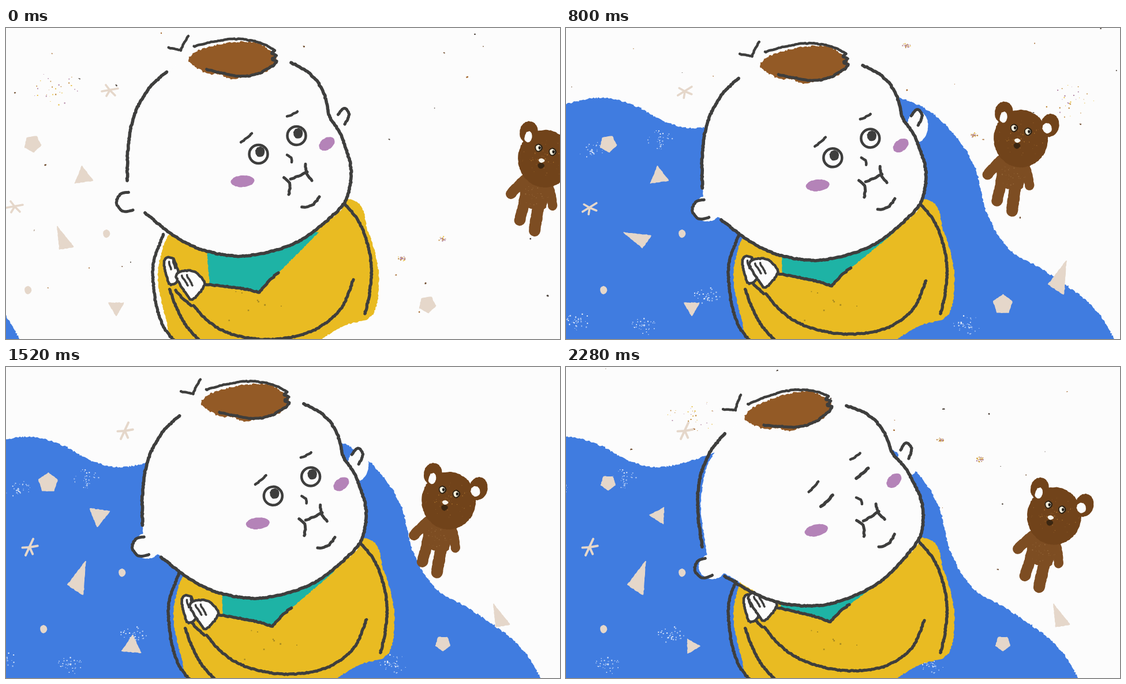
Animation of 960x540 px, one loop 2320 ms. Source, as an HTML page:

```html
<!DOCTYPE html>
<html lang="en">
<head>
<meta charset="utf-8">
<title>Sleepy baby and bear</title>
<style>
html, body { margin: 0; width: 100%; height: 100%; overflow: hidden; background: #fcfcfc; }
svg { display: block; width: 100vw; height: 100vh; }
</style>
</head>
<body>
<svg id="stage" viewBox="0 0 960 540"></svg>
<script>
const LOOP = 2320, STEP = 40;
const INK = '#3e3e3d', PAPER = '#fcfcfc', BEIGE = '#e5d7ca', YELLOW = '#e9bb22';
const FUR = '#7d4d22', FACE = '#71431a', BLUSH = '#b483b8';
const stage = document.getElementById('stage');

function el(parent, tag, attrs) {
  const node = document.createElementNS('http://www.w3.org/2000/svg', tag);
  for (const k in attrs) node.setAttribute(k, attrs[k]);
  parent.appendChild(node);
  return node;
}
const group = parent => el(parent, 'g');
const show = (node, on) => node.setAttribute('display', on ? 'inline' : 'none');
const move = (node, value) => node.setAttribute('transform', value);
const parse = s => s.trim().split(/\s+/).map(p => p.split(',').map(Number));

function seeded(seed) {
  return () => {
    seed = (seed + 0x6D2B79F5) | 0;
    let v = Math.imul(seed ^ (seed >>> 15), 1 | seed);
    v = (v + Math.imul(v ^ (v >>> 7), 61 | v)) ^ v;
    return ((v ^ (v >>> 14)) >>> 0) / 4294967296;
  };
}

// Uniform Catmull-Rom between b and c
function spline(a, b, c, d, u) {
  return 0.5 * (2 * b + (c - a) * u + (2 * a - 5 * b + 4 * c - d) * u * u
    + (3 * b - a - 3 * c + d) * u * u * u);
}

// Hand-drawn path: smooth or straight run through the points with a shaky edge
function chalk(pts, { closed = false, rough = 0.7, straight = false } = {}) {
  const rnd = seeded(pts.length * 31 + 5), n = pts.length, out = [];
  const at = i => closed ? pts[(i + n) % n] : pts[Math.max(0, Math.min(n - 1, i))];
  for (let i = 0; i < (closed ? n : n - 1); i++) {
    const a = at(i - 1), b = at(i), c = at(i + 1), d = at(i + 2);
    const count = Math.max(1, Math.round(Math.hypot(c[0] - b[0], c[1] - b[1]) / 2.5));
    for (let k = 0; k < count; k++) {
      const u = k / count;
      out.push([0, 1].map(j => {
        const v = straight ? b[j] + (c[j] - b[j]) * u : spline(a[j], b[j], c[j], d[j], u);
        return (v + (rnd() - 0.5) * 2 * rough).toFixed(1);
      }).join(' '));
    }
  }
  if (!closed) out.push(at(n - 1).join(' '));
  return 'M' + out.join('L') + (closed ? 'Z' : '');
}

function fill(parent, pts, color, opts) {
  return el(parent, 'path', { d: chalk(parse(pts), { closed: true, rough: 1, ...opts }), fill: color });
}
function line(parent, pts, width = 5.5, color = INK) {
  return el(parent, 'path', {
    d: chalk(parse(pts)), fill: 'none', stroke: color, 'stroke-width': width,
    'stroke-linecap': 'round', 'stroke-linejoin': 'round'
  });
}
const lines = (parent, width, ...list) => list.forEach(pts => line(parent, pts, width));

// Points of a regular polygon, also used for wobbly ovals
const ngon = (n, rx, deg = 0, ry = rx) => Array.from({ length: n }, (_, i) => {
  const a = (deg + i * 360 / n) * Math.PI / 180;
  return [rx * Math.cos(a), ry * Math.sin(a)];
});
function oval(parent, x, y, rx, ry, color, turn = 0) {
  return el(parent, 'path', {
    d: chalk(ngon(12, rx, 0, ry), { closed: true, rough: 0.6 }), fill: color,
    transform: `translate(${x} ${y}) rotate(${turn})`
  });
}

// Grains thickest in the middle of a round patch
function grains(parent, x, y, spread, count, size, colors) {
  const rnd = seeded(Math.round(x * 7 + y)), d = colors.map(() => '');
  for (let i = 0; i < count; i++) {
    const a = rnd() * 2 * Math.PI, r = rnd() * spread, s = (size * (0.5 + rnd())).toFixed(1);
    const px = (x + r * Math.cos(a)).toFixed(1), py = (y + r * Math.sin(a) * 0.7).toFixed(1);
    d[i % d.length] += `M${px} ${py}h${s}v${s}h-${s}z`;
  }
  colors.forEach((fill, i) => el(parent, 'path', { d: d[i], fill }));
}

// ---- paper with three alternating sets of dust ----
el(stage, 'rect', { width: 960, height: 540, fill: PAPER });
const dust = ['85,105 755,365 685,399', '220,85 647,127 717,160', '870,130 705,185 589,30'].map((spots, set) => {
  const g = group(stage), rnd = seeded(70 + set);
  for (let i = 0; i < 36; i++) {
    grains(g, rnd() * 960, rnd() * 500, 1.5, 1 + Math.floor(rnd() * 3), 1.7, [['#4a4038', '#a3672c', '#6d4a2c'][i % 3]]);
  }
  parse(spots).forEach(([x, y], i) =>
    grains(g, x, y, i ? 7 : 45, 30, 1.5, ['#e8c04a', '#c08a3c', '#b48aa8']));
  return g;
});

// ---- blue wave ----
const blue = group(stage);
fill(blue, `-60,600 -60,165 0,134 70,121 125,135 185,165 240,173 323,150 450,100 586,122 655,160
  712,235 735,320 775,385 840,424 915,480 957,541 975,600`, '#407ce0', { rough: 1.4 });
for (const [x, y] of parse('50,212 25,508 140,516 250,465 168,194 700,515')) {
  grains(blue, x, y, 24, 38, 1.5, ['#e6eefb', '#a9c5f3']);
}

// ---- paper cut-outs, each with three poses ----
const scene = group(stage);
const cutouts = [];
const fast = slot => Math.floor(slot / 2) % 3;
const slow = slot => Math.floor(slot / 3);
function cutout(x, y, pick, poses) {
  const g = group(scene);
  move(g, `translate(${x} ${y})`);
  const nodes = poses.map(({ d, turn = '', open }) => el(g, 'path', {
    d, transform: turn, fill: open ? 'none' : BEIGE, stroke: BEIGE, 'stroke-width': open ? 3.6 : 1.5,
    'stroke-linejoin': 'round', 'stroke-linecap': 'round'
  }));
  cutouts.push({ pick, nodes });
  return g;
}
const flat = pts => chalk(pts, { closed: true, straight: true, rough: 0.5 });
const polygon = (n, ...poses) => poses.map(([r, deg]) => ({ d: flat(ngon(n, r, deg)) }));
const turned = (shape, ...turns) => turns.map(turn => ({ ...shape, turn }));

const fives = polygon(5, [14.5, 10], [13, 90], [17, -90]);
const spike = turned({ d: flat(parse('-12,-25 -8,14 16,10')) }, '',
  'translate(-1 2) rotate(43) scale(1.28)', 'translate(0 -5) rotate(-45) scale(1.05)');
const star = turned({ d: 'M-14 2L14 -3M0 0L-7 -9M0 0L-6 10M0 0L9 9', open: true }, '',
  'translate(-1 3) rotate(-55) scale(1.1)', 'translate(-1 2) rotate(-22)');

cutout(73, 201, fast, fives);
cutout(757, 480, slow, fives);
cutout(207, 108, slow, star);
cutout(42, 310, slow, star);
cutout(161, 258, fast, polygon(3, [18, -98], [16, 182], [20, 98]));
cutout(218, 485, fast, polygon(3, [15, 90], [14, 0], [19, -85]));
cutout(128, 370, slow, spike);
const farSpike = cutout(857, 437, fast, [spike[1], spike[0], spike[0]]);
for (const [x, y] of [[201, 357], [65, 455]]) oval(scene, x, y, 6.3, 7, BEIGE);

// ---- bear ----
const bear = group(stage);
fill(bear, '838,258 826,285 823,318 842,322 866,324 874,300 880,268', FUR);
line(bear, '832,273 820,284 808,297', 18, FUR);
line(bear, '872,282 878,300 880,318', 16, FUR);
line(bear, '833,305 828,325 823,343', 19, FUR);
line(bear, '858,305 853,335 849,361', 20, FUR);
oval(bear, 839, 190, 16, 19, FACE, 8);
oval(bear, 918, 214, 16, 20, FACE, 12);
oval(bear, 867, 236, 47, 50, FACE);
oval(bear, 838, 198, 6.5, 10, PAPER, 12);
oval(bear, 913, 219, 8, 9, PAPER, -20);
grains(bear, 867, 236, 46, 60, 1.1, ['#a8702c', '#8f5c2a']);
grains(bear, 850, 300, 26, 26, 1.2, ['#96683a']);
for (const [x, y] of [[856, 217], [880, 224]]) {
  oval(bear, x, y, 7, 7, '#2f2416');
  oval(bear, x - 0.5, y, 4.8, 5, '#f6efdc');
  oval(bear, x + 1.5, y, 2.4, 2.6, '#1d1a16');
}
oval(bear, 860, 248, 6, 5, '#3a2611');
oval(bear, 861, 239, 5.5, 3.6, '#f8f4ea', 5);

// ---- baby: body ----
const baby = group(stage);
fill(baby, `330,355 306,364 290,430 305,508 322,546 420,575 540,556 610,518 662,498 673,430
  655,355 618,296 440,330`, YELLOW);
lines(baby, 5.3, '300,358 283,405 282,440 287,480 299,517 318,543',
  '608,300 636,332 652,370 660,415 657,460 649,496', '311,454 320,480 338,515 362,542');
grains(baby, 460, 475, 70, 9, 2, ['#a88a20']);

const teal = el(baby, 'path', { fill: '#1eb3a5' });
const COLLAR = parse('380,447 466,459 497,427');
const armLines = ['352,482 372,504 402,525 445,538 500,540 560,525 606,489 629,437',
  '371,445 410,449 440,453 466,459', '466,459 484,438 499,425', '321,456 333,469 348,482']
  .map(s => ({ pts: parse(s), node: line(baby, s, 5.2) }));

function hand(outline, ...fingers) {
  const g = group(baby), shape = fill(g, outline, PAPER, { rough: 0.7 });
  shape.setAttribute('stroke', INK);
  shape.setAttribute('stroke-width', 4.5);
  lines(g, 3.6, ...fingers);
  return g;
}
const leftHand = hand('301,413 303,401 311,398 319,404 327,432 320,443 311,445 305,430', '309,406 313,419', '316,403 320,417');
const rightHand = hand('322,432 331,423 353,423 371,444 350,471 336,457', '331,430 342,447', '340,429 350,447');

// ---- baby: head ----
const head = group(baby);
const skin = group(head);
oval(skin, 613, 169, 18, 27, PAPER, 5);
oval(skin, 243, 301, 24, 22, PAPER);
fill(skin, `302,82 262,125 243,175 237,220 240,300 268,320 320,362 370,385 430,396 490,387 540,367
  580,338 612,308 624,245 605,180 590,160 574,100 521,60 440,24 380,24`, PAPER);
fill(head, '345,58 354,42 385,31 435,24 468,28 496,52 478,76 432,87 412,87 398,80 375,79', '#935a26', { rough: 1.5 });
lines(head, 4.5, '352,32 390,23 427,19 465,25 493,39', '308,34 330,39', '330,39 335,27 343,14',
  '434,199 443,192 453,183', '514,154 522,151 532,145', '514,221 521,225 522,233');
lines(head, 5, '603,150 608,143 615,140 621,148 620,157 614,167', '240,285 227,288 219,298 221,310 231,318 247,316',
  '520,263 534,257 549,250', '509,260 517,267 519,278 517,289', '546,237 548,252 557,265',
  '540,311 551,310 562,304 570,293', '374,72 410,80 437,84 465,79 488,66',
  '493,39 487,44 495,48 488,54 496,58 490,66');
lines(head, 5.6, '306,76 278,101 256,135 244,170 238,215 237,265',
  '521,60 553,79 573,103 583,130 588,155 605,181 618,215 625,247 622,280 611,307 580,337 540,367 490,387 430,396 370,386 320,362 268,321');
oval(head, 437, 266, 20.5, 10, BLUSH, -4);
oval(head, 583, 201, 15, 10, BLUSH, -36);

const openEyes = group(head);
for (const [x, y] of [[464.5, 219], [530.5, 187]]) {
  el(openEyes, 'circle', { cx: x, cy: y, r: 16, fill: PAPER, stroke: INK, 'stroke-width': 4.5 });
  oval(openEyes, x + 2.5, y - 4, 8.2, 9, INK);
}
const shutEyes = group(head);
lines(shutEyes, 5.6, '451,227 462,220 474,210', '519,188 530,181 542,173');

// ---- motion ----
function smooth(t, from, to) {
  const u = Math.max(0, Math.min(1, (t - from) / (to - from)));
  return u * u * (3 - 2 * u);
}

// Bear's floating path: time, x, y, turn
const FLOAT = [[0, 67, -9, 0], [320, 0, 0, 0], [600, -58, -26, 1.4], [1000, -91, -52, -3.8],
  [1520, -101, -4, 1], [1800, -58, 39, 5], [2280, -25, 22, 3.7]];
function floatAt(t) {
  const at = k => FLOAT[Math.max(0, Math.min(FLOAT.length - 1, k))];
  const i = Math.max(0, FLOAT.findIndex(k => k[0] >= t) - 1);
  const u = (t - at(i)[0]) / (at(i + 1)[0] - at(i)[0]);
  return [1, 2, 3].map(j => spline(at(i - 1)[j], at(i)[j], at(i + 1)[j], at(i + 2)[j], u));
}

function draw(ms) {
  const t = Math.floor((ms % LOOP) / STEP) * STEP;
  const slot = Math.floor(t / 120) % 8;
  const enter = Math.pow(1 - Math.min(1, t / 300), 3);
  const drift = 69 * Math.pow(Math.max(0, t - 320) / 1960, 1.7);

  move(blue, `translate(${-933 * enter - drift} 0)`);
  for (const g of [scene, baby]) move(g, `translate(${-27 * enter} 0)`);
  dust.forEach((g, i) => show(g, slot !== 4 && i === Math.min(2, slot >> 1)));
  cutouts.forEach(c => c.nodes.forEach((n, i) => show(n, c.pick(slot) === i)));
  show(farSpike, t > 0);

  const [bx, by, turn] = floatAt(t);
  move(bear, `translate(${bx} ${by}) rotate(${turn} 858 296)`);

  // Nods off, wakes a little, then drops deeper
  const nod = smooth(t, 600, 1040) - 0.68 * smooth(t, 1160, 1480) + 1.9 * smooth(t, 1520, 2300);
  const sink = 4.9 * nod * (2.23 - nod);
  move(head, `translate(0 ${sink}) rotate(${-3.9 * nod} 550 296)`);
  move(skin, `translate(610 0) scale(${1 - 0.008 * nod} 1) translate(-610 0)`);

  // Arms rise most at the hands and hardly at the elbow
  const rise = 1 - Math.pow(1 - Math.min(1, nod), 2);
  const lift = ([x, y]) => [x - 8 * rise, y + (0.12 * (x - 345) - 31) * rise];
  for (const { pts, node } of armLines) node.setAttribute('d', chalk(pts.map(lift)));
  teal.setAttribute('d', chalk([[374, 375], ...COLLAR.map(lift), [569, 355], [500, 340]], { closed: true, straight: true }));
  move(leftHand, `translate(${7 * rise} ${-3 * rise})`);
  move(rightHand, `translate(${-6 * rise} ${-31 * rise})`);

  const shut = (t >= 920 && t < 1200) || t >= 2080;
  show(openEyes, !shut);
  show(shutEyes, shut);
}

const start = performance.now();
function tick() {
  draw(performance.now() - start);
  requestAnimationFrame(tick);
}
draw(0);
requestAnimationFrame(tick);
</script>
</body>
</html>
```
